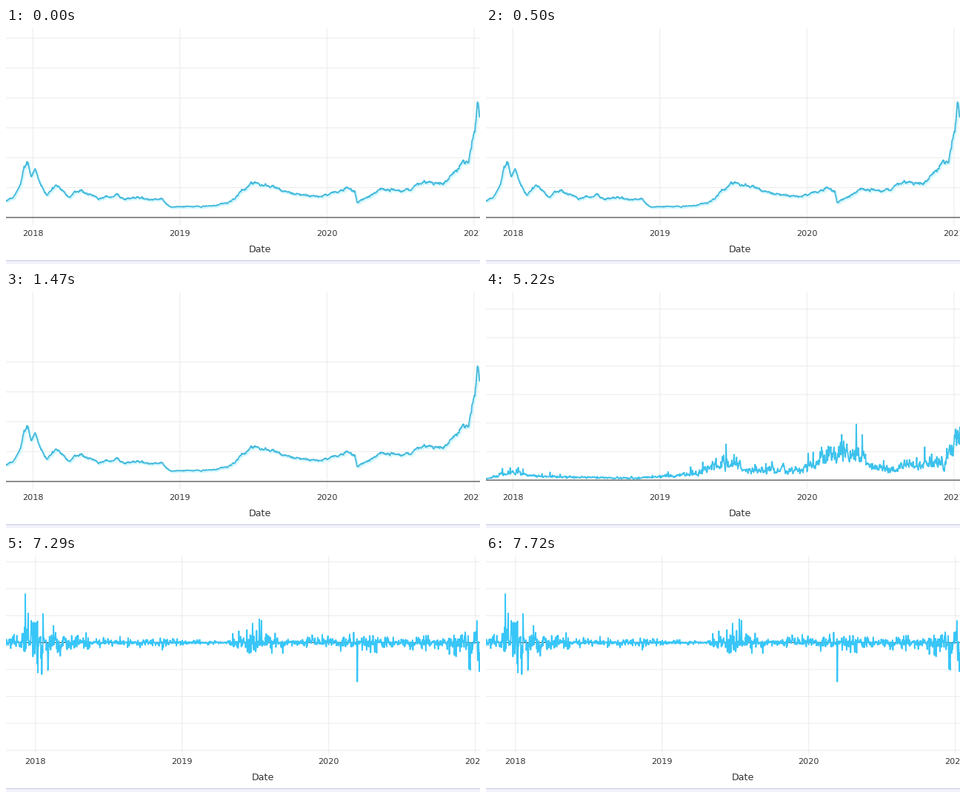
A matplotlib script for the animation above (8000 ms loop, 640 by 320 pixels).

```python
import matplotlib.pyplot as plt
import numpy as np
from matplotlib.animation import FuncAnimation

W, H, DPI = 640, 320, 80
PX = 72 / DPI               # one pixel in points
STEP = 10                   # ms per frame
LOOP = 8000
CUTS = [500, 2110, 7290]    # times at which the view changes

GRID, INK, AXIS = "#ebebeb", "#333333", "#4a4a4a"

days = np.arange(0, W + 2, 198.55 / 365)
rng = np.random.default_rng(18)

fig = plt.figure(figsize=(W / DPI, H / DPI), dpi=DPI, facecolor="white")
ax = fig.add_axes([0, 0, 1, 1])
ax.set(xlim=(0, W), ylim=(H, 0))
ax.axis("off")


def trend(*points):
    x, y = np.transpose(points)
    return np.interp(days, x, y)


def drift(memory):
    """Noise of unit spread that remembers part of the day before."""
    out = rng.normal(size=days.size)
    for i in range(1, out.size):
        out[i] = memory * out[i - 1] + np.sqrt(1 - memory**2) * out[i]
    return out


# Each series is a height in pixels above its zero line.
def price():
    base = trend(
        (0, 23), (9, 25), (20, 45), (24, 67), (28, 77), (34, 58), (39, 67),
        (46, 47), (55, 30), (68, 45), (85, 28), (101, 38), (125, 25),
        (150, 31), (158, 26), (209, 25), (222, 14), (283, 16), (304, 22),
        (331, 48), (362, 42), (384, 33), (425, 28), (458, 40), (471, 36),
        (474, 20), (505, 37), (545, 37), (560, 47), (590, 44), (616, 76),
        (624, 76), (633, 121), (637, 164), (640, 145))
    return base * (1 + 0.03 * drift(0.8))


def volume():
    base = trend(
        (0, 2), (20, 7), (40, 11), (60, 6), (115, 4), (200, 2.5), (260, 6),
        (283, 9), (307, 20), (333, 22), (350, 14), (392, 13), (435, 16),
        (460, 32), (500, 35), (522, 18), (545, 12), (570, 22), (620, 23),
        (633, 45), (640, 70))
    bursts = (rng.random(days.size) > 0.97) * rng.uniform(0.3, 1, days.size)
    return base * np.exp(0.2 * drift(0.5)) * (1 + bursts)


def change():
    spread = trend(
        (0, 7), (20, 9), (26, 24), (50, 22), (70, 12), (120, 5), (200, 3),
        (214, 6), (245, 2), (298, 2), (310, 8), (336, 18), (365, 8),
        (400, 5), (460, 6), (475, 9), (500, 7), (540, 5), (590, 6),
        (610, 14), (632, 20), (640, 34))
    out = spread * np.clip(rng.laplace(0, 0.45, days.size), -2, 2)
    for x, peak in (26, 66), (48, -43), (474, -53):
        out[np.searchsorted(days, x)] = peak
    return out


def line(x, y, color, width=1.0, z=1):
    return ax.plot(x, y, color=color, lw=width * PX, zorder=z, snap=False,
                   solid_joinstyle="round")[0]


def label(x, y, text, size):
    return ax.text(x, y, text, ha="center", va="baseline", color=INK,
                   fontsize=size * PX, family="DejaVu Sans", clip_on=True)


def view(series, color, zero, gap, first=36.2, year=198.55, top=0,
         glow=False):
    parts = [line([0, W], [y, y], GRID)
             for y in zero + gap * np.arange(-8, 9) if top < y < 265]
    for k in range(4):
        x = first + k * year
        parts.append(line([x, x], [0, 267], GRID))
        parts.append(label(x, 282.5, str(2018 + k), 11.3))
    parts.append(label(first + 307, 304, "Date", 12.6))
    parts.append(line([0, W], [zero, zero], AXIS, 1.2, 2))
    if glow:
        parts.append(line(days + 1.5, zero - series + 1.5, "#d3f7fc", 3, 1.5))
    parts.append(line(days, zero - series, color, 1.8, 3))
    return parts


ax.fill_between([0, W], 316, H, color="#f1f1fb", lw=0)
line([0, W], [315.5, 315.5], "#c9c9e4")

prices = price()
views = [
    view(prices, "#43b9dc", 256.9, 40.5, glow=True),
    view(prices, "#43b9dc", 256.9, 40.5, top=90, glow=True),
    view(volume(), "#3dc2ec", 255.1, 38.65),
    view(change(), "#38c6f8", 117.4, 36.5, first=39.8, year=198),
]


def update(i):
    now = np.searchsorted(CUTS, i * STEP, side="right")
    for k, parts in enumerate(views):
        for part in parts:
            part.set_visible(k == now)
    return []


anim = FuncAnimation(fig, update, frames=LOOP // STEP, interval=STEP,
                     init_func=lambda: update(0), repeat=True, repeat_delay=0)
plt.show()
```
